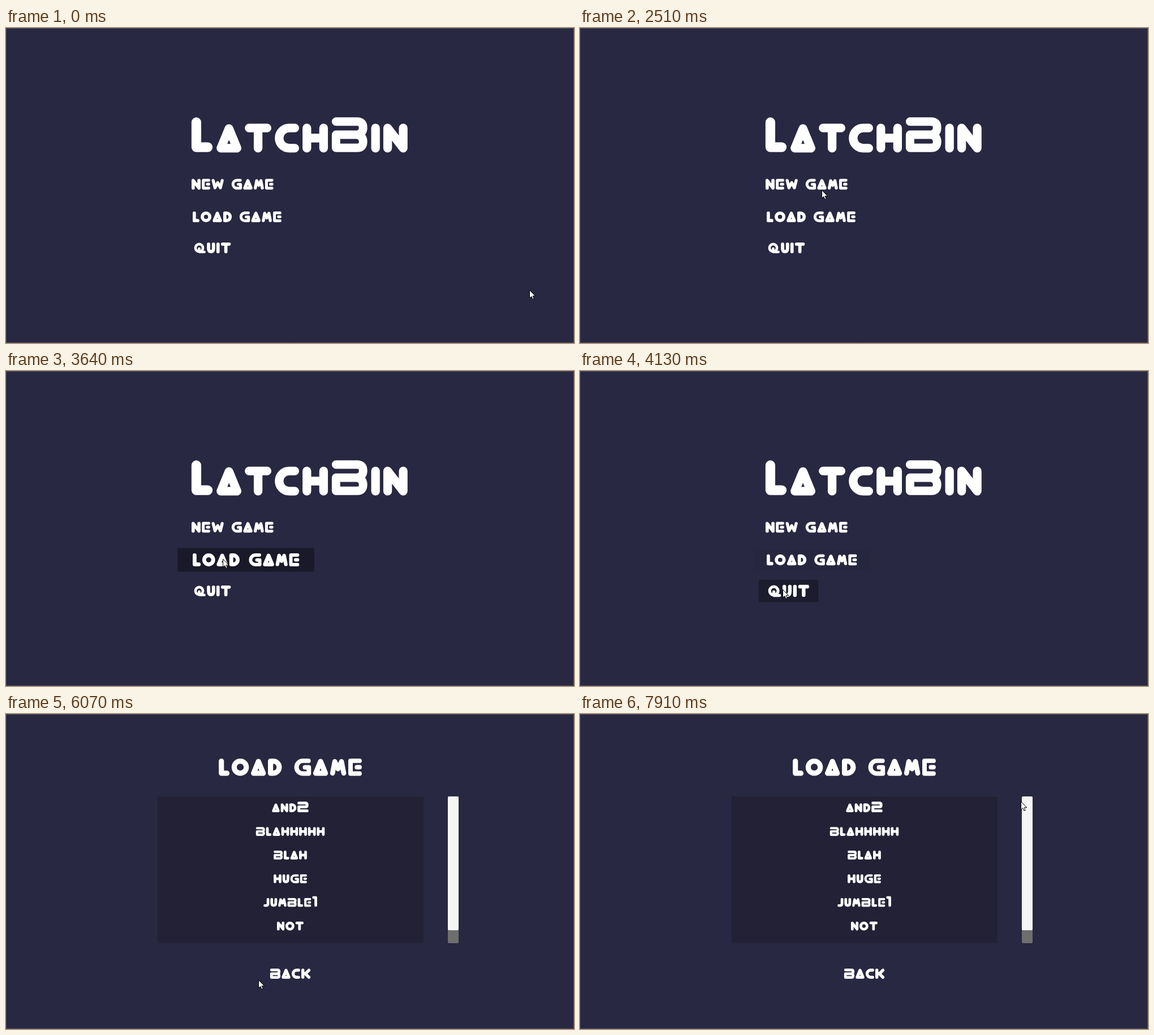
An HTML page with a canvas for the animation above (8 s loop, 1004x558 px).

```html
<!DOCTYPE html>
<html lang="en">
<head>
<meta charset="utf-8">
<title>LatchBin</title>
<style>
  html, body { margin: 0; width: 100%; height: 100%; overflow: hidden; background: #292842; }
  canvas { display: block; }
</style>
</head>
<body>
<canvas id="stage" width="1004" height="558" role="img" aria-label="LatchBin: new game, load game, quit"></canvas>
<script>
const ctx = document.getElementById('stage').getContext('2d');
const LOOP = 8000, SWITCH = 5130;

// Rounded stroke alphabet, 100 units high: [width, centre line, pen]
const STEM = 'M15 15V85', RING = 'M15 50a35 35 0 1 0 70 0a35 35 0 1 0-70 0';
const GLYPHS = {
  a: [86, 'M43 17L71 85H15Z'],
  b: [102, 'M13 13H72Q89 13 89 30T72 50H13V87H72Q89 87 89 70T72 50', 26],
  c: [84, 'M69 15H50A35 35 0 0 0 50 85H69'],
  d: [80, 'M15 15H30A35 35 0 0 1 30 85H15Z'],
  e: [78, 'M65 13H13V87H65M50 50H65', 26],
  g: [97, 'M82 13H50A37 37 0 0 0 50 87H84V51H62', 26],
  h: [88, STEM + 'M73 15V85M15 50H73'],
  i: [30, STEM],
  j: [66, 'M51 15V65Q51 85 31 85H15'],
  k: [90, STEM + 'M75 15L40 50L75 85M15 50H40'],
  l: [62, STEM + 'H47'],
  m: [93, 'M14 85L27 17L46 60L66 17L79 85', 28],
  n: [84, 'M15 85V15L69 85V15'],
  o: [100, RING],
  q: [110, RING + 'M50 88H98M50 57V80', 24],
  r: [90, 'M15 85V15H55Q75 15 75 35T55 55H40L75 85'],
  t: [92, 'M15 15H77M46 15V85'],
  u: [76, 'M15 15V55Q15 85 38 85T61 55V15'],
  w: [114, 'M15 15L32 83L57 35L82 83L99 15', 28],
  1: [55, 'M15-5H40V85'],
  2: [125, 'M16-4H90Q109-4 109 18T90 40H16V84H109', 32],
  ' ': [48, '']
};
const GAP = 12, CAP = 1.235;
for (const g of Object.values(GLYPHS)) g[1] = new Path2D(g[1]);

const glyph = ch => GLYPHS[ch.toLowerCase()];
const isCap = ch => ch !== ch.toLowerCase();
const advance = ch => glyph(ch)[0] * (isCap(ch) ? CAP : 1) + GAP;
const textWidth = s => [...s].reduce((w, ch) => w + advance(ch), -GAP);

function text(s, x, baseline, size, color = '#fff') {
  ctx.strokeStyle = color;
  ctx.lineCap = ctx.lineJoin = 'round';
  for (const ch of s) {
    const [, path, pen = 30] = glyph(ch), cap = isCap(ch), k = cap ? size * CAP : size;
    ctx.save();
    ctx.translate(x, baseline - 100 * k);
    ctx.scale(k, k);
    ctx.lineWidth = cap ? pen / 1.1 : pen;
    ctx.stroke(path);
    ctx.restore();
    x += advance(ch) * size;
  }
}
const centred = (s, baseline, size) => text(s, 502.5 - textWidth(s) * size / 2, baseline, size);

function box(x, y, w, h, color) {
  ctx.fillStyle = color;
  ctx.beginPath();
  ctx.roundRect(x, y, w, h, 2);
  ctx.fill();
}

// 0 to 1 after start, back to 0 after end
function ease(u) {
  u = Math.max(0, Math.min(1, u));
  return u * u * (3 - 2 * u);
}
const pulse = (t, start, end) => ease((t - start) / 290) - ease((t - end) / 290);

// Pointer stops: time, x, y
const PATH = [
  [520, 925, 464], [940, 943, 415], [1510, 942, 414], [1930, 920, 403], [2080, 835, 380],
  [2510, 427, 287], [2780, 387, 279], [3110, 387, 279], [3220, 386, 306], [3490, 383, 333],
  [3770, 383, 333], [4130, 358, 387], [4400, 358, 387], [4760, 381, 326], [5290, 381, 326],
  [5680, 261, 365], [6070, 446, 471], [6320, 980, 486], [6710, 803, 266], [7220, 787, 310],
  [7490, 786, 287], [7910, 779, 155]
];

function pointerAt(t) {
  const i = PATH.findIndex(p => p[0] > t);
  if (i < 1) return PATH.at(i).slice(1);
  const [t0, x0, y0] = PATH[i - 1], [t1, x1, y1] = PATH[i], u = (t - t0) / (t1 - t0);
  return [x0 + (x1 - x0) * u, y0 + (y1 - y0) * u];
}

const BUTTONS = [
  { label: 'new game', x: 328, y: 276.8, pad: 20.8, hover: t => pulse(t, 2510, 3215) },
  { label: 'load game', x: 330, y: 334.5, pad: 22.3, press: 5010,
    hover: t => pulse(t, 3287, 3890) + pulse(t, 4490, LOOP) },
  { label: 'quit', x: 332, y: 389.5, pad: 14.5, hover: t => pulse(t, 3966, 4440) }
];

function menu(t) {
  text('LatchBin', 327, 220.5, .51);
  for (const { label, x, y, pad, press, hover } of BUTTONS) {
    const h = hover(t), k = 1 + .2 * h, pressed = t >= press;
    const w = textWidth(label) * .19 + 2 * pad;
    const alpha = pressed ? .63 : .38 * Math.min(1, h * 1.35);
    box(x - pad * k, y - 17.6 * k, w * k, 35.2 * k, `rgba(0,0,0,${alpha})`);
    text(label, x, y + 9.5 * k, .19 * k, pressed ? '#9a9a9a' : '#fff');
  }
}

const SAVES = ['and2', 'blahhhhh', 'blah', 'huge', 'jumble1', 'not', 'or'];

function loadScreen(t) {
  const scroll = 24 * pulse(t, 6900, 7500);
  centred('load game', 109.5, .306);
  box(268, 146, 470, 260, '#222136');
  ctx.save();
  ctx.beginPath();
  ctx.rect(268, 146, 470, 260);
  ctx.clip();
  SAVES.forEach((s, i) => centred(s, 174 + 41.9 * i - scroll, .157));
  ctx.restore();
  box(781, 146, 19, 260, '#6e6e6e');
  box(781, 146 + scroll, 19, 237, '#f5f5f5');
  centred('back', 469, .179);
}

const ARROW = new Path2D('M.5 .5V14.5L3.7 11.6L6 16.5L8.2 15.5L6 10.8H10.3Z');

function pointer(t) {
  ctx.save();
  ctx.translate(...pointerAt(t));
  ctx.fillStyle = '#fff';
  ctx.strokeStyle = '#000';
  ctx.lineJoin = 'miter';
  ctx.fill(ARROW);
  ctx.stroke(ARROW);
  ctx.restore();
}

function draw(t) {
  ctx.fillStyle = '#292842';
  ctx.fillRect(0, 0, 1004, 558);
  (t < SWITCH ? menu : loadScreen)(t);
  ctx.strokeStyle = '#57575f';
  ctx.lineWidth = 1;
  ctx.strokeRect(.5, .5, 1003, 557);
  pointer(t);
}

let start;
function tick(now) {
  start ??= now;
  draw((now - start) % LOOP);
  requestAnimationFrame(tick);
}
draw(0);
requestAnimationFrame(tick);
</script>
</body>
</html>
```
